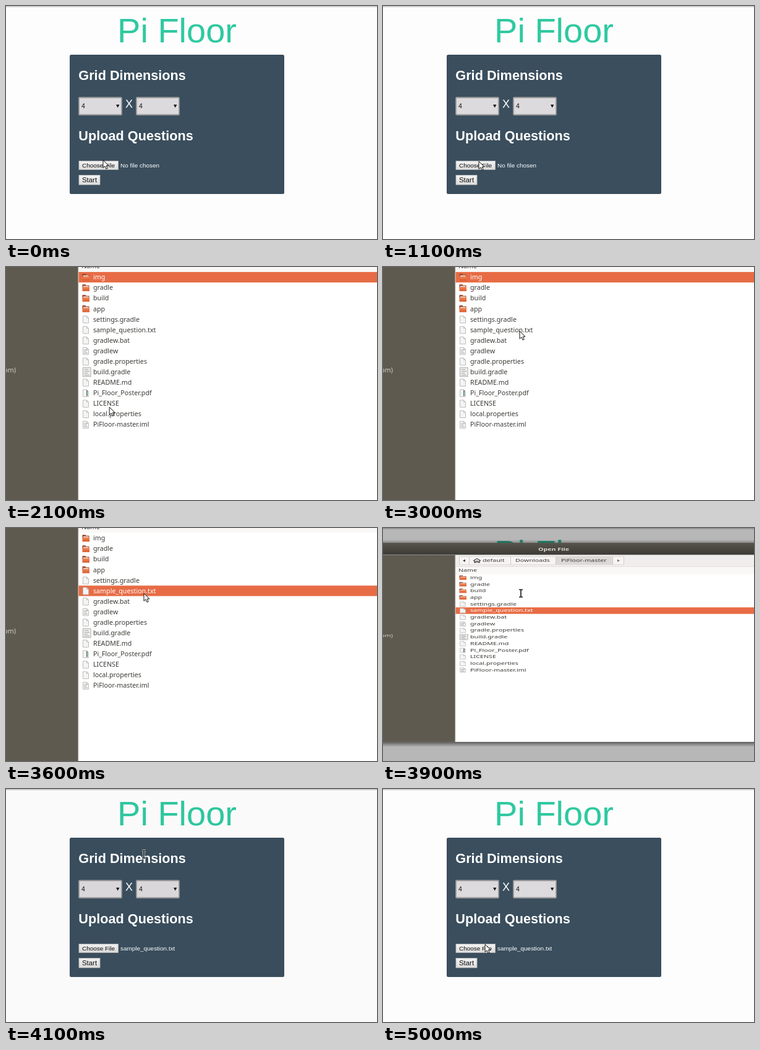
Animation of 600 by 378 pixels, one loop 5.1 s. Source, as an HTML page:

```html
<!DOCTYPE html>
<html lang="en">
<head>
<meta charset="utf-8">
<title>Pi Floor</title>
<style>
  html, body { margin: 0; width: 100%; height: 100%; overflow: hidden; background: #fefdfe; }
  svg { display: block; width: 100%; height: 100%; }
  .page text { font-family: "Liberation Sans", Arial, sans-serif; fill: #fff; }
  .page .dark { fill: #111; }
  .page .heading { font-size: 21.7px; font-weight: bold; }
  .dialog text { font: 10.7px "Noto Sans", sans-serif; fill: #3c3b37; }
  .dialog .caption { font-weight: bold; fill: #dfdbd2; }
  .dialog .selected text { fill: #fff; }
  .row .bar { fill: none; }
  .row.selected .bar { fill: #e76c45; }
</style>
</head>
<body>
<svg viewBox="0 0 600 378">
  <defs>
    <linearGradient id="titlebar" x2="0" y2="1">
      <stop stop-color="#57544d"/><stop offset="1" stop-color="#3d3b37"/>
    </linearGradient>
    <linearGradient id="button" x2="0" y2="1">
      <stop stop-color="#f3f3f3"/><stop offset="1" stop-color="#dcdcdc"/>
    </linearGradient>
    <linearGradient id="folder" x2="0" y2="1">
      <stop stop-color="#f08a5c"/><stop offset="1" stop-color="#d95a2c"/>
    </linearGradient>
    <linearGradient id="shadow" x2="0" y2="1">
      <stop stop-opacity=".5"/><stop offset="1" stop-opacity="0"/>
    </linearGradient>
  </defs>

  <g class="page">
    <rect width="600" height="378" fill="#fefdfe"/>
    <rect y=".4" width="600" height="1.2" fill="#b4b3b5"/>
    <text x="276.5" y="59" text-anchor="middle" style="font-size:56px;fill:#2fc9a0">Pi Floor</text>
    <rect x="103" y="79" width="347" height="226" rx="2.5" fill="#3a4e5d"/>
    <text class="heading" x="117.3" y="120">Grid Dimensions</text>
    <text class="heading" x="117.3" y="218">Upload Questions</text>
    <g id="selects"></g>
    <text x="193" y="165" font-size="18">X</text>
    <g id="buttons"></g>
    <text id="fileName" x="185" y="262" font-size="9.95"></text>
  </g>

  <rect id="dim" width="600" height="378"/>

  <g class="dialog" id="dialog">
    <rect y="441.5" width="600" height="13" fill="url(#shadow)"/>
    <rect y="73.5" width="600" height="8" fill="url(#shadow)" transform="scale(1 -1)" opacity=".5"/>
    <rect y="-73.5" width="600" height="515" fill="#fff"/>
    <rect y="-42" width="600" height="30" fill="#f0eeec"/>
    <rect y="-12" width="600" height="19.500" fill="#f9f8f7"/>
    <rect id="side" y="-42" width="116" height="483.5"/>
    <rect x="116" y="-42" width="1.200" height="483.5" fill="#98948c"/>
    <rect y="-73.5" width="600" height="31" fill="url(#titlebar)"/>
    <text class="caption" x="276" y="-53.5" text-anchor="middle">Open File</text>
    <text x="16" y="170.5" text-anchor="end" style="fill:#d2cec5">om)</text>
    <g id="pathBar"></g>
    <path d="M117 -12H600" stroke="#dedad6"/>
    <text x="122" y="2">Name</text>
    <g id="rows"></g>
  </g>

  <g id="cursor">
    <path id="arrow" d="M0 0V12.5L3 9.8L5 14.4L7.2 13.4L5.2 9H9Z" fill="#fff" stroke="#111" stroke-linejoin="round"/>
    <g id="beam" fill="none">
      <path d="M-3 -6H3M0 -6V6M-3 6H3" stroke="#fff" stroke-width="3"/>
      <path d="M-3 -6H3M0 -6V6M-3 6H3" stroke="#222" stroke-width="1.7"/>
    </g>
  </g>
</svg>

<script>
const LOOP = 5100, STEP = 100, MIDDLE = 188;
const $ = id => document.getElementById(id);
const show = (el, on) => { el.style.display = on ? "" : "none"; };

$("selects").innerHTML = [118, 211].map(x => `
  <rect x="${x}" y="148.5" width="69" height="28" rx="1" fill="#dcdadc" stroke="#9b9a9b" stroke-width="1.8"/>
  <text class="dark" x="${x + 4}" y="165.5" font-size="10.5">4</text>
  <path d="M${x + 60} 160h5.4l-2.7 5z" fill="#111"/>`).join("");

$("buttons").innerHTML = [
  ["Choose File", 251.5, 63.5, 14, 9.95, 262],
  ["Start", 274.5, 34, 15.5, 11.4, 286]
].map(([label, y, w, h, size, base]) => `
  <rect x="118" y="${y}" width="${w}" height="${h}" fill="url(#button)" stroke="#b9b9b9" stroke-width=".8"/>
  <text class="dark" x="123" y="${base}" font-size="${size}">${label}</text>`).join("");

// Breadcrumbs: left edge, right edge, label, label x
$("pathBar").innerHTML = [
  [123, 139], [139, 206, "default", 161], [206, 279, "Downloads", 214],
  [279, 371, "PiFloor-master", 288], [371, 389]
].map(([a, b, label, x]) => `
  <rect x="${a + .5}" y="-37.5" width="${b - a}" height="20" fill="${a === 279 ? "#dcd9d6" : "#f6f5f3"}" stroke="#d0ccc7"/>
  ${label ? `<text x="${x}" y="-23.8">${label}</text>` : ""}`).join("") + `
  <path d="M133 -31v7l-4 -3.5z" fill="#3c3b37"/>
  <path d="M379 -31v7l4 -3.5z" fill="#77746e"/>
  <path d="M146 -27L152 -32.5L158 -27M148 -27.5V-22.5H150.5V-26H153.5V-22.5H156V-27.5" fill="none" stroke="#3c3b37" stroke-width="1.5"/>`;

const sheet = `<path d="M124.5 -5.5h6l3 3v8.5h-9z" fill="#f4f4f3" stroke="#bdbcba"/><path d="M130.5 -5.5v3h3" fill="none" stroke="#bdbcba"/>`;
const lines = `<path d="M126 -1.5h6M126 1h4M126 3.5h6" stroke="#aaa9a7"/>`;
const icons = {
  folder: `<path d="M123.5 -5.5h5l1 1.5h5v5h-11z" fill="#9c4a2c"/><path d="M125 -3h8.5v3h-8.5z" fill="#f1e3db"/><path d="M123.5 -1.5h11.5v7h-11.5z" fill="url(#folder)"/>`,
  sheet,
  script: sheet + lines,
  build: `<rect x="124.5" y="-7" width="12.5" height="14.5" fill="#f2f2f1" stroke="#a9a8a6"/><path d="M126.5 -4h7M126.5 -1h8.5M126.5 2h6M126.5 5h8.5" stroke="#9e9d9b"/>`,
  pdf: sheet + `<path d="M131 -4v2.5M131 1v4" stroke="#666" stroke-width="1.8"/><path d="M131 -1.5v2.5" stroke="#3aa77a" stroke-width="2.2"/>`
};
const files = [
  ["img", "folder"], ["gradle", "folder"], ["build", "folder"], ["app", "folder"],
  ["settings.gradle", "sheet"], ["sample_question.txt", "sheet"], ["gradlew.bat", "sheet"],
  ["gradlew", "script"], ["gradle.properties", "sheet"], ["build.gradle", "build"],
  ["README.md", "sheet"], ["Pi_Floor_Poster.pdf", "pdf"], ["LICENSE", "sheet"],
  ["local.properties", "sheet"], ["PiFloor-master.iml", "script"]
];
$("rows").innerHTML = files.map(([name, icon], i) => `
  <g class="row" transform="translate(0 ${(16.6 + 17.07 * i).toFixed(2)})">
    <rect class="bar" x="117.5" y="-8.5" width="483" height="17"/>
    <g class="icon">${icons[icon]}</g><text x="141" y="3.7">${name}</text>
  </g>`).join("");
const rows = [...$("rows").children];

// time, x, y
const cursorPath = [
  [0, 157, 250], [400, 155, 251], [1000, 155, 251], [1100, 155, 252], [1600, 152, 256],
  [1800, 152, 256], [2200, 170, 222], [2800, 226, 104], [3000, 221, 104], [3300, 221, 104],
  [3600, 223, 106], [4400, 223, 106], [5000, 165, 252]
];
// time, vertical scale, dialog opacity, page dimming
const dialogSteps = [
  [0, 1, 0, 0], [1700, .795, .8, 0], [1800, .93, .95, .1], [1900, 1, 1, .28],
  [3900, .627, 1, .28], [4000, .35, .35, .1], [4100, 1, 0, .012], [4200, 1, 0, 0]
];

function cursorAt(t) {
  const i = cursorPath.findIndex(p => p[0] > t);
  if (i < 0) return cursorPath.at(-1).slice(1);
  const [a, b] = [cursorPath[i - 1], cursorPath[i]];
  const k = (t - a[0]) / (b[0] - a[0]), ease = k * k * (3 - 2 * k);
  return [1, 2].map(n => a[n] + (b[n] - a[n]) * ease);
}

function draw(t) {
  const [, scale, opacity, dim] = dialogSteps.findLast(s => s[0] <= t);
  const dialog = $("dialog");
  show(dialog, opacity > 0);
  dialog.setAttribute("opacity", opacity);
  dialog.setAttribute("transform", `translate(0 ${MIDDLE * (1 - scale)}) scale(1 ${scale})`);
  $("dim").setAttribute("opacity", dim);

  const opening = t < 1800;
  $("side").setAttribute("fill", opening ? "#4a4644" : "#5f5a50");
  const selected = t < 3400 ? 0 : 5;
  rows.forEach((row, i) => {
    row.classList.toggle("selected", i === selected);
    show(row.querySelector(".icon"), !opening || i < 12);
  });
  $("fileName").textContent = t >= 4000 ? "sample_question.txt" : "No file chosen";

  const [x, y] = cursorAt(t);
  const overHeading = [[100, 126], [196, 224]].some(([top, end]) => y > top && y < end);
  const beam = t >= 3900 && overHeading;
  $("cursor").setAttribute("transform", `translate(${x} ${y})`);
  show($("beam"), beam);
  show($("arrow"), !beam);
}

const start = performance.now();
function tick() {
  const t = (performance.now() - start) % LOOP;
  draw(Math.floor(t / STEP) * STEP);
  requestAnimationFrame(tick);
}
tick();
</script>
</body>
</html>
```
